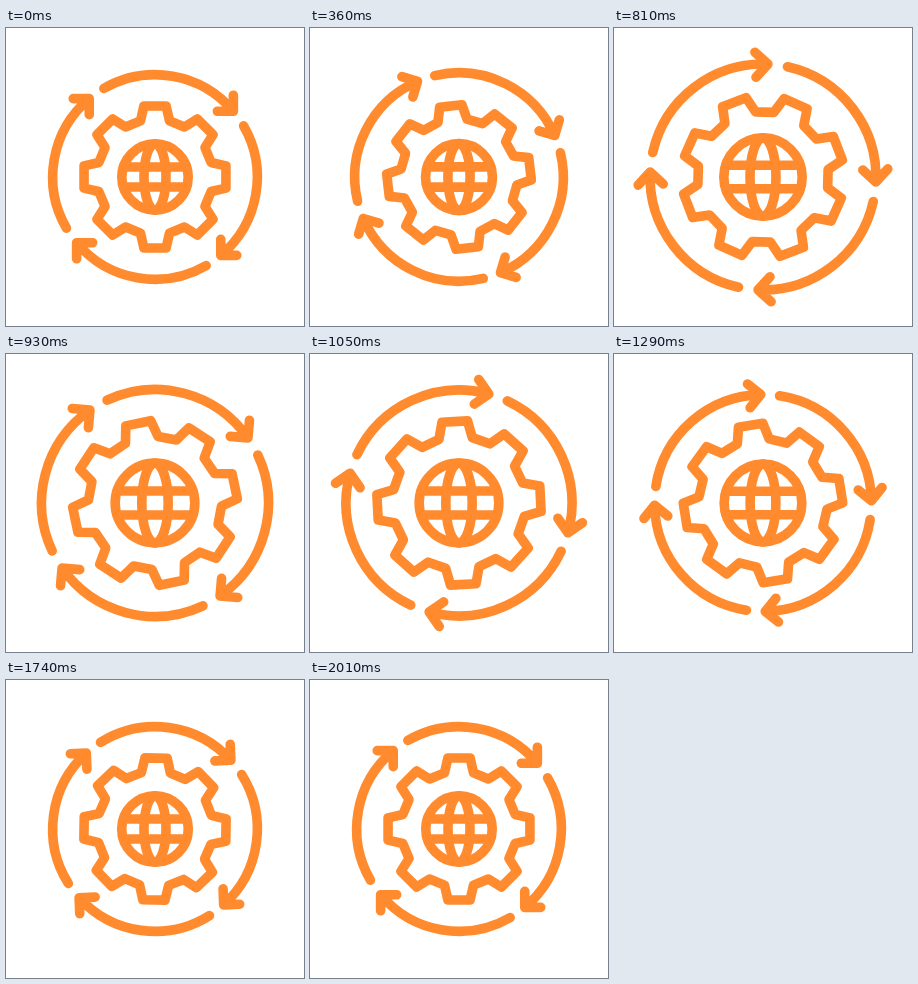
An HTML page for the animation above (2.25 s loop, 298 by 298 pixels).

```html
<!DOCTYPE html>
<html lang="en">
<head>
<meta charset="utf-8">
<title>Global process</title>
<style>
  html, body { margin: 0; width: 100%; height: 100%; overflow: hidden; background: #fff; }
  svg { display: block; width: 100%; height: 100%; }
  .icon { fill: none; stroke: #ff8b2e; stroke-width: 9.6; stroke-linecap: round; stroke-linejoin: round; }
  .icon * { vector-effect: non-scaling-stroke; }
</style>
</head>
<body>
<svg viewBox="0 0 298 298">
  <g class="icon" transform="translate(149 149)">
    <path id="ring"/>
    <path id="gear"/>
    <g id="globe">
      <circle r="33.2"/>
      <ellipse rx="11" ry="33.2"/>
      <path d="M-31.5-10H31.5M-31.5 10H31.5"/>
    </g>
  </g>
</svg>
<script>
const LOOP = 2250, STEP = 30;
const [ring, gear, globe] = ['ring', 'gear', 'globe'].map(id => document.getElementById(id));

const polar = (radius, degrees) => {
  const a = degrees * Math.PI / 180;
  return [radius * Math.cos(a), radius * Math.sin(a)];
};
const text = ([x, y]) => `${x.toFixed(2)} ${y.toFixed(2)}`;

// Four arcs, each ending in an open arrowhead.
function ringPath() {
  const radius = 102.3, barb = 16;
  return [0, 90, 180, 270].map(turn => {
    const tip = polar(radius, turn - 40);
    const end = angle => {
      const [x, y] = polar(barb, turn + angle);
      return [tip[0] + x, tip[1] + y];
    };
    return `M${text(polar(radius, turn - 120))}A${radius} ${radius} 0 0 1 ${text(tip)}` +
      `M${text(end(-90))}L${text(tip)}L${text(end(180))}`;
  }).join('');
}

function gearPath() {
  const points = [];
  for (let tooth = 0; tooth < 360; tooth += 45) {
    points.push(polar(58, tooth - 14.5), polar(71.8, tooth - 8.9),
      polar(71.8, tooth + 8.9), polar(58, tooth + 14.5));
  }
  return 'M' + points.map(text).join('L') + 'Z';
}

// Smooth curve through poses, at rest at both ends.
const TIMES = [0, 300, 600, 810, 1050, 1290, 1530, 1770, 2010];
function curve(values) {
  const last = TIMES.length - 1;
  const slope = i => i === 0 || i === last ? 0 :
    (values[i + 1] - values[i - 1]) / (TIMES[i + 1] - TIMES[i - 1]);
  return t => {
    if (t >= TIMES[last]) return values[last];
    const i = TIMES.findIndex(time => time > t) - 1;
    const span = TIMES[i + 1] - TIMES[i], u = (t - TIMES[i]) / span, v = 1 - u;
    return values[i] * v * v * (1 + 2 * u) + values[i + 1] * u * u * (1 + 2 * v) +
      span * u * v * (slope(i) * v - slope(i + 1) * u);
  };
}

const ringTurn = curve([0, 11, 53.5, 132.5, 235.3, 308.8, 347.2, 358.6, 360]);
const gearTurn = curve([0, -4, -25, -66, -138, -189, -219, -224.4, -225]);
const ringScale = curve([1, 1.01, 1.072, 1.104, 1.104, 1.06, 1.008, 1, 1]);
const gearScale = curve([1, 1.002, 1.05, 1.13, 1.15, 1.11, 1.012, 1, 1]);
const globeScale = curve([1, 1, 1.065, 1.18, 1.2, 1.17, 1.04, 1, 1]);

function render(now) {
  const t = Math.floor(now % LOOP / STEP) * STEP;
  ring.setAttribute('transform', `rotate(${ringTurn(t)}) scale(${ringScale(t)})`);
  gear.setAttribute('transform', `rotate(${gearTurn(t)}) scale(${gearScale(t)})`);
  globe.setAttribute('transform', `scale(${globeScale(t)})`);
}

ring.setAttribute('d', ringPath());
gear.setAttribute('d', gearPath());
const start = performance.now();
function tick() {
  render(performance.now() - start);
  requestAnimationFrame(tick);
}
tick();
</script>
</body>
</html>
```
